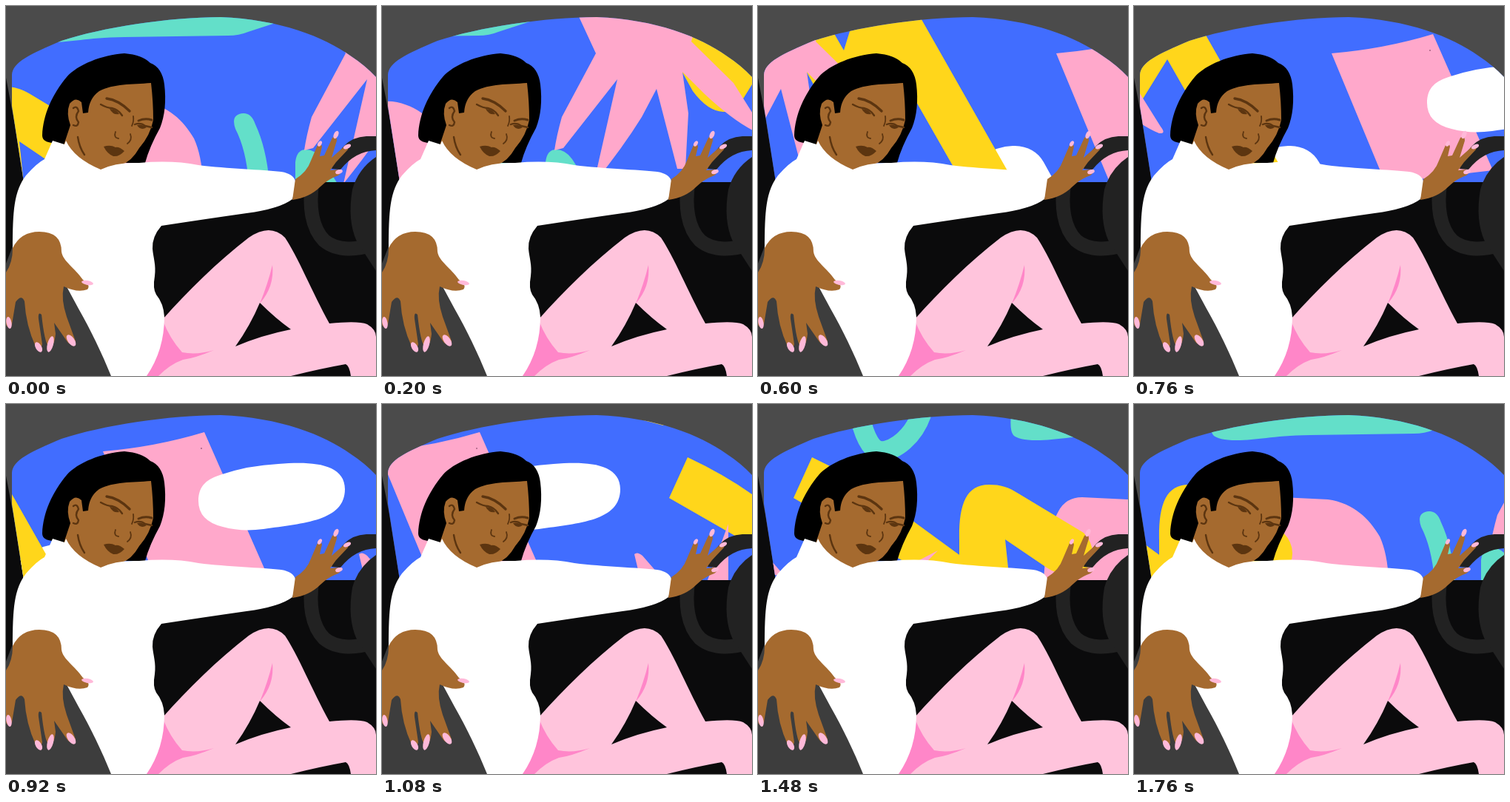
An HTML page that plays this animation: 500 by 500 pixels, repeating every 1.8 s.

```html
<!DOCTYPE html>
<html lang="en">
<head>
<meta charset="utf-8">
<title>Driving</title>
<style>
html, body { margin: 0; width: 100%; height: 100%; overflow: hidden; background: #4b4b4b; }
svg { display: block; width: 100%; height: 100%; }
.teal { fill: #63dfc9; } .pink { fill: #ffa8cb; } .yellow { fill: #ffd61b; } .white { fill: #fff; }
.skin { fill: #a56a2f; } .nail { fill: #ffb9d9; } .wheel { fill: #222; }
.leg { fill: #ffc4dc; } .shade { fill: #ff86c8; } .dark { fill: #0b0b0c; } .ink { fill: #5c3510; }
.line { fill: none; stroke: #5c3510; stroke-width: 2.4; stroke-linecap: round; stroke-linejoin: round; }
</style>
</head>
<body>
<svg viewBox="0 0 500 500">
<defs>
  <clipPath id="window">
    <path d="M8 93C9 76 32 65 75 47C130 29 220 15 290 15C370 18 430 42 465 67Q485 80 500 96V238H24L8 135Z"/>
  </clipPath>
  <g id="scenery">
    <path class="teal" d="M27 5Q23 35 29 42Q36 49 60 49C90 49 105 43 160 42L300 40Q315 40 327 35L370 21V5Z"/>
    <path class="pink" d="M70 240C72 205 76 170 90 145Q100 126 122 126L184 129C219 134 240 155 254 179Q265 203 266 240Z"/>
    <path class="yellow" d="M-44 240V185C-45 138 -36 109 -4 109C12 109 22 112 36 121L124 174Q141 192 134 214Q124 232 100 230Q86 229 74 221L18 183L24 240Z"/>
    <path class="teal" d="M328 240Q325 195 310 166Q303 146 321 145Q332 145 337 160Q352 192 356 240Z"/>
    <path class="teal" d="M391 240V211Q393 194 405 194Q418 194 427 207L448 240Z"/>
    <path class="white" d="M771 240Q785 215 815 203Q835 188 857 189Q884 190 896 211L912 240Z"/>
    <path class="yellow" d="M596 8L626 60L642 8H726L732 20L857 240H787L691 72L652 135Q642 144 631 143Q610 142 590 115L575 88Z"/>
    <path class="pink" d="M434 10L459 64L413 150Q406 175 403 195L415 192L488 99L456 240Q495 192 521 150L541 112L569 220H580L584 145L576 89L606 119Q650 160 680 172Q690 173 682 163L645 104L588 48L600 8Z"/>
    <path class="pink" d="M913 64Q984 58 1050 38L1131 222Q1060 230 986 240Z"/>
    <circle cx="1046" cy="60" r="1" fill="#a66180"/>
    <path class="white" d="M1042 131C1042 110 1054 101 1074 95Q1110 83 1150 81C1195 77 1240 80 1240 115C1240 158 1185 161 1130 169Q1100 173 1075 166Q1042 158 1042 131Z"/>
    <path class="yellow" d="M1252 5L1256 18L1298 29L1310 10Z"/>
    <path class="yellow" d="M1331 72Q1380 95 1418 122L1537 209L1520 250L1306 127Z"/>
    <path class="pink" d="M1265 228L1259 203Q1263 199 1270 205L1290 228L1330 260L1358 238L1386 162V238L1420 240L1501 198L1440 260Z"/>
    <path d="M1396 18Q1406 62 1424 64C1444 63 1468 44 1479 13" fill="none" stroke="#63dfc9" stroke-width="27"/>
  </g>
</defs>

<rect width="500" height="500" fill="#4b4b4b"/>
<path class="dark" d="M0 97L10 150L24 238H500V500H0Z"/>
<path d="M414 238C409 270 413 300 430 317C448 332 475 330 500 321" fill="none" stroke="#222" stroke-width="19"/>
<g clip-path="url(#window)">
  <rect width="500" height="240" fill="#416dff"/>
  <use id="near" href="#scenery"/>
  <use id="far" href="#scenery"/>
</g>
<path class="wheel" d="M440 220Q444 202 457 189Q468 177 487 176H500V195Q472 196 452 221Z"/>
<path class="wheel" d="M500 204Q476 220 468 248Q461 290 474 318L500 358Z"/>

<path d="M0 348L10 322H90L144 500H0Z" fill="#3d3d3d"/>

<path class="leg" d="M213 422C245 386 285 346 328 313Q357 293 377 313C394 338 414 387 437 429Q476 425 488 430Q500 437 500 447V500H466Q464 486 459 484Q425 490 385 500H188L205 460Z"/>
<path class="dark" d="M343 401Q364 422 385 437Q345 445 310 460Q330 432 343 401Z"/>
<path class="shade" d="M212 425Q221 449 238 468Q258 472 281 465Q255 476 239 478Q222 484 206 500H185L207 455Z"/>
<path class="shade" d="M360 350Q363 379 343 402Q354 375 360 350Z"/>

<path d="M64 185Q49 184 49 175C50 146 63 119 82 96C97 79 130 66 160 64Q184 66 195 77Q211 83 214 106Q218 140 208 165Q194 190 188 212H150L90 195Z"/>
<path class="skin" d="M78 188L87 161Q81 145 86 132Q94 122 102 130L104 145L111 144Q112 125 126 115C145 105 170 106 196 104Q199 130 199 154Q195 175 180 192Q170 210 155 215L128 224L105 215Z"/>
<path class="white" d="M63 182L79 187L81 182Q92 206 128 221Q148 211 180 212Q225 208 260 215C300 220 345 221 372 224Q389 227 391 237Q391 252 387 261Q370 274 325 280C285 286 247 291 210 297Q197 312 198 328C199 340 203 350 201 365Q198 382 203 390Q213 402 214 420Q214 465 190 500H142C130 470 114 437 98 409L78 372L9 330C9 275 11 250 27 229Q42 212 52 207Z"/>

<g class="line">
  <path d="M97 177Q99 191 106 201M91 138Q96 134 98 142Q92 150 98 157Q97 164 91 161"/>
  <path d="M136 125Q152 127 167 142" stroke-width="3.4"/>
  <path d="M179 155Q188 151 197 154" stroke-width="3"/>
  <path d="M128 133Q137 138 143 138Q152 140 157 148"/>
  <path d="M174 160Q182 157 188 162L197 164"/>
  <path d="M172 149Q173 156 170 162M168 173Q171 181 164 186M148 170Q145 178 152 179" stroke-width="1.8"/>
</g>
<path class="ink" d="M140 139Q149 139 153 146Q145 148 140 139ZM177 161Q183 159 190 164Q182 169 177 161Z"/>
<path class="ink" d="M132 190Q141 187 148 191Q153 190 160 196Q153 204 145 203Q137 200 132 190Z"/>

<path class="skin" d="M391 234Q407 224 412 209L421 188Q426 185 427 190L424 203L430 202L441 178Q447 174 447 182L440 205L457 190Q464 188 462 194L446 211L438 222L449 221Q456 224 449 229Q435 234 425 244Q410 259 387 262Z"/>
<path class="skin" d="M9 327Q20 305 45 305Q75 305 75 332C77 345 92 353 104 370Q115 377 110 383Q97 388 78 379Q74 396 82 420L94 453Q91 462 83 454L65 428L67 443Q65 462 58 461Q52 455 48 417Q43 412 44 423L49 457Q46 469 40 460Q27 432 25 399Q21 389 13 400L8 430Q3 438 0 430V360Q9 347 9 327Z"/>
<g class="nail" id="nails"></g>
</svg>
<script>
const STEP_MS = 40, STEP_PX = 34, LOOP_MS = 1800, WORLD_PX = 1574;
const near = document.getElementById('near');
const far = document.getElementById('far');

// x, y, long radius, short radius, angle
const nails = [
  [424, 186, 4, 2.5, -60], [446, 174, 5.5, 3, -65], [461, 190, 5.5, 2.8, -25], [450, 224, 5, 2.8, -20],
  [110, 374, 8, 3, 10], [4, 428, 8, 3.5, 80], [44, 461, 7.5, 4, 60], [60, 457, 11, 4, 105], [88, 452, 9, 4.5, 55]
];
document.getElementById('nails').innerHTML = nails.map(([x, y, rx, ry, angle]) =>
  `<ellipse rx="${rx}" ry="${ry}" transform="translate(${x} ${y}) rotate(${angle})"/>`).join('');

function draw(time) {
  const offset = Math.floor((time % LOOP_MS) / STEP_MS) * STEP_PX;
  near.setAttribute('transform', `translate(${-offset} 0)`);
  far.setAttribute('transform', `translate(${WORLD_PX - offset} 0)`);
}

let start;
function tick(now) {
  start ??= now;
  draw(now - start);
  requestAnimationFrame(tick);
}
draw(0);
requestAnimationFrame(tick);
</script>
</body>
</html>
```
